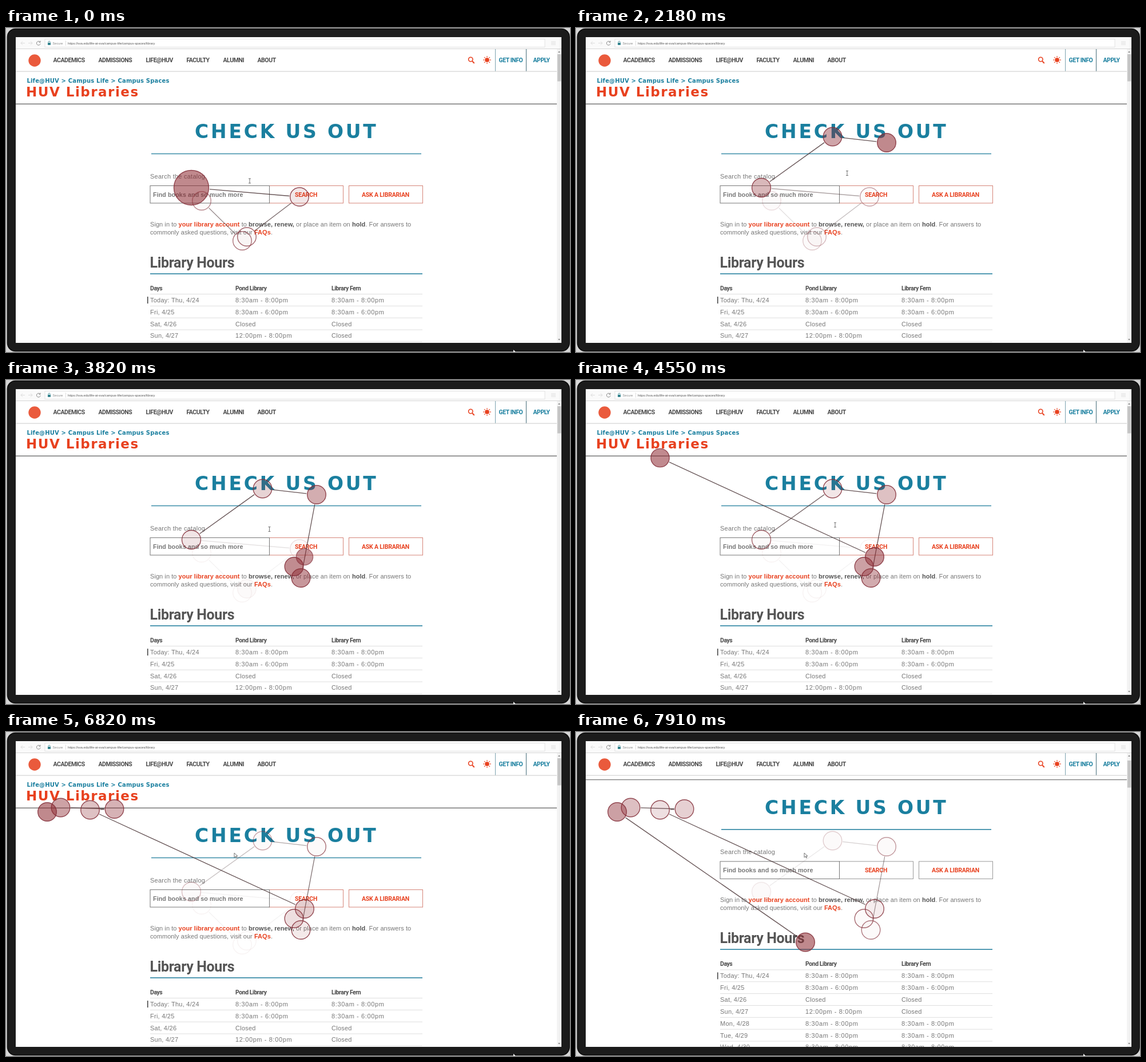
An HTML page that plays this animation: 986 px wide and 568 px high, repeating every 8000 ms.

```html
<!DOCTYPE html>
<html lang="en">
<head>
<meta charset="utf-8">
<title>Library page gaze plot</title>
<style>
  html, body { margin: 0; width: 100%; height: 100%; overflow: hidden; background: #d6d6d6; }
  svg { display: block; }
  text { font: 11px "Liberation Sans", Arial, sans-serif; fill: #777; letter-spacing: .06px; white-space: pre; }
  .bold { font-weight: 700; fill: #555; }
  .wide { font-family: "DejaVu Sans", sans-serif; font-weight: 700; }
  .narrow { font-family: Roboto, sans-serif; font-weight: 700; font-size: 10.5px; fill: #4a4a4a; letter-spacing: -.45px; }
  .button { letter-spacing: -.2px; }
  .tiny { font-size: 5.7px; fill: #555; letter-spacing: 0; }
  .time { letter-spacing: .62px; }
  .date { letter-spacing: .25px; }
  text.teal, .teal { fill: #1a7f9f; }
  text.red, .red { fill: #e8411f; }
</style>
</head>
<body>
<svg width="986" height="568" viewBox="0 0 986 568">
  <rect x="2.5" y="1.5" width="982.5" height="565" rx="14" fill="#1b1b1b" stroke="#0b0b0b" stroke-width="1.5"/>
  <path d="M887 564v5l4-1z" fill="#fff"/>
  <svg x="17" y="16" width="954" height="536" viewBox="17 16 954 536">
    <rect x="17" y="16" width="954" height="536" fill="#fff"/>
    <g id="page"></g>
    <g id="chrome"></g>
    <g id="gaze"></g>
    <g id="pointer" fill="none" stroke="#666" stroke-width=".9">
      <path id="beam" d="M-2-4h4M0-4v8M-2 4h4"/>
      <path id="arrow" d="M-1-4v8l2-2 1.5 3 1.2-.6-1.4-2.8h2.7z" fill="#fff"/>
    </g>
  </svg>
</svg>
<script>
const LOOP = 8000;
const el = id => document.getElementById(id);
const clamp = v => Math.max(0, Math.min(1, v));
const smooth = v => { v = clamp(v); return v * v * (3 - 2 * v); };

const text = (x, y, cls, content, style = '') =>
  `<text x="${x}" y="${y}" class="${cls}" style="${style}">${content}</text>`;
const line = (x1, y1, x2, y2, color, width = 1, opacity = 1) =>
  `<line x1="${x1}" y1="${y1}" x2="${x2}" y2="${y2}" stroke="${color}" stroke-width="${width}" opacity="${opacity}"/>`;
const box = (x, y, w, h, fill, stroke = 'none', cls = '') =>
  `<rect x="${x}" y="${y}" width="${w}" height="${h}" fill="${fill}" stroke="${stroke}" class="${cls}"/>`;

function pageMarkup() {
  const bold = s => `<tspan class="bold">${s}</tspan>`;
  const link = s => `<tspan class="bold red" style="fill:#e8411f">${s}</tspan>`;
  const open = '8:30am - 8:00pm', friday = '8:30am - 6:00pm', shut = 'Closed';
  const rows = [
    ['Today: Thu, 4/24', open, open], ['Fri, 4/25', friday, friday], ['Sat, 4/26', shut, shut],
    ['Sun, 4/27', '12:00pm - 8:00pm', shut], ['Mon, 4/28', open, open],
    ['Tue, 4/29', open, open], ['Wed, 4/30', open, open]
  ];
  const table = rows.map((row, i) => {
    const y = 480.9 + i * 20.85;
    return line(252, y - 14.4, 728, y - 14.4, '#dedede') + row.map((cell, c) =>
      text([252, 401, 569][c], y, c && cell !== shut ? 'time' : 'date', cell)).join('');
  }).join('');
  return text(36.5, 96.3, 'wide teal', 'Life@HUV &gt; Campus Life &gt; Campus Spaces', 'font-size:10px;letter-spacing:.16px')
    + text(35, 120.3, 'wide red', 'HUV Libraries', 'font-size:23px;letter-spacing:1.5px')
    + line(17, 133.2, 963, 133.2, '#777', 1.4)
    + text(330, 193.3, 'wide teal', 'CHECK US OUT', 'font-size:33px;letter-spacing:3.8px')
    + line(254, 220.5, 726, 220.5, '#3a8ca8', 1.7)
    + text(252, 263.6, 'date', 'Search the catalog')
    + box(460.5, 276.5, 129, 30.5, 'none', '#d58478', 'outline')
    + box(599.5, 276.5, 129, 30.5, 'none', '#d58478', 'outline')
    + box(252, 276.5, 208.5, 30.5, 'none', '#777')
    + text(257, 295.7, 'bold', 'Find books and so much more', 'font-size:10.75px;fill:#777')
    + text(505, 296, 'narrow button red', 'SEARCH')
    + text(622, 296, 'narrow button red', 'ASK A LIBRARIAN')
    + text(252, 347.6, '', `Sign in to ${link('your library account')} to ${bold('browse, renew,')} or place an item on ${bold('hold')}. For answers to`)
    + text(252, 362, '', `commonly asked questions, visit our ${link('FAQs')}.`)
    + text(251.5, 419.5, 'narrow', 'Library Hours', 'font-size:25px;letter-spacing:-.35px;fill:#555')
    + line(252, 430.8, 728, 430.8, '#3a8ca8', 1.7)
    + text(252, 459.8, 'narrow', 'Days') + text(401, 459.8, 'narrow', 'Pond Library') + text(569, 459.8, 'narrow', 'Library Fern')
    + table + line(247.7, 471, 247.7, 483, '#444', 1.6);
}

function chromeMarkup() {
  const nav = { ACADEMICS: 82.5, ADMISSIONS: 161.5, 'LIFE@HUV': 244.5, FACULTY: 315.5, ALUMNI: 379.5, ABOUT: 439.5 };
  const rays = Array.from({ length: 8 }, (_, i) =>
    `<path d="M841 51.2v-2" stroke="#e8411f" stroke-width="1.3" transform="rotate(${i * 45} 841 56)"/>`).join('');
  return box(17, 16, 954, 60, '#fff')
    + box(17, 16, 954, 20.5, '#fafafa') + box(68, 19.5, 874, 14, '#fff', '#e2e2e2')
    + line(17, 36.5, 971, 36.5, '#d5d5d5')
    + '<path d="M33 26.5h-7m3-3-3 3 3 3M39 26.5h7m-3-3 3 3-3 3" fill="none" stroke="#ddd"/>'
    + '<path d="M59.4 24.4a3.4 3.4 0 1 0 .8 3M60 22.5v2.6h-2.6" fill="none" stroke="#888"/>'
    + box(73, 26, 5, 3.8, '#2d7f8a') + '<path d="M74 26v-1.5a1.5 1.5 0 0 1 3 0V26" fill="none" stroke="#2d7f8a" stroke-width=".8"/>'
    + text(81.5, 29, 'tiny', 'Secure', 'fill:#888') + line(104.5, 22, 104.5, 31, '#ddd')
    + text(108, 29, 'tiny', 'https://sva.edu/life-at-sva/campus-life/campus-spaces/library')
    + [24, 26.5, 29].map(y => line(953, y, 961, y, '#ddd')).join('')
    + '<circle cx="50" cy="57" r="10.7" fill="#ea5a3c"/>'
    + Object.entries(nav).map(([label, x]) => text(x, 60.2, 'narrow', label)).join('')
    + '<path d="M815.3 58.3l3.4 3.6" stroke="#e8411f" stroke-width="2"/><circle cx="812.3" cy="55" r="3.7" fill="none" stroke="#e8411f" stroke-width="1.6"/>'
    + '<circle cx="841" cy="56" r="3.8" class="red"/>' + rays
    + line(855.5, 37, 855.5, 76, '#7ca3af') + line(909.5, 37, 909.5, 76, '#5d7f8a', 1.2)
    + text(861.5, 60.2, 'narrow teal', 'GET INFO') + text(921.5, 60.2, 'narrow teal', 'APPLY')
    + line(17, 76.2, 963, 76.2, '#d5d5d5', 1.2)
    + box(963, 37, 8, 515, '#f3f3f3')
    + '<path d="M965 43l2-2.5 2 2.5zM965 545l2 2.5 2-2.5z" fill="#888"/>'
    + '<rect id="thumb" x="964" y="46" width="6.5" height="47.5" fill="#c6c6c6"/>';
}

// Fixations in gaze order: x, y, start and end of dwell in ms.
const fixations = [
  [342, 303, -6000, -5000], [413, 373, -5000, -4500], [421, 366, -4500, -4100], [513, 296, -4100, -3450],
  [324, 280, -3450, 450], [448.5, 190.5, 540, 1130], [543, 201, 1130, 2500], [515.5, 347, 2500, 3300],
  [503.5, 327, 3300, 3700], [522, 310, 3700, 4270], [147, 136.5, 4270, 4750], [189.5, 135, 4750, 5300],
  [95.5, 132.5, 5300, 5900], [72, 140, 5900, 7050], [401, 368.5, 7050, 9000]
].map(([x, y, start, end], i) => ({ x, y, start, end, first: i === 4 }));

function gazeMarkup(t) {
  const residue = t < 7600 ? .06 : 0;
  const seen = fixations.filter(f => f.start <= t).map(f => {
    const age = Math.max(0, t - f.end), grown = clamp((t - f.start) / 300);
    return {
      ...f,
      r: f.first ? 30.5 - 14 * clamp((t - 400) / 240) : 13.5 + 2.8 * grown,
      fill: Math.max(.025, .55 * (1 - age / 4300)) * (.8 + .2 * grown) * (age < 8000),
      ink: Math.max(residue, .85 * clamp((8000 - age) / 4500)) * (.6 + .4 * grown)
    };
  });
  const links = seen.slice(1).map((b, i) => {
    const a = seen[i], dx = b.x - a.x, dy = b.y - a.y, d = Math.hypot(dx, dy);
    if (d < a.r + b.r) return '';
    const from = (a.r + 1.5) / d, to = 1 - (b.r + 1.5) / d;
    return line(a.x + dx * from, a.y + dy * from, a.x + dx * to, a.y + dy * to, '#4a3436', 1.3, Math.min(a.ink, b.ink));
  });
  const dots = seen.map(f => `<circle cx="${f.x}" cy="${f.y}" r="${f.r}" fill="#8c2830" fill-opacity="${f.fill}" stroke="#84303a" stroke-width="1.4" stroke-opacity="${f.ink}"/>`);
  return links.join('') + dots.join('');
}

const pointerPath = [
  [450, 426, 268], [1270, 480, 240], [3090, 468, 269], [4550, 453, 254], [5450, 299, 194], [6820, 400, 216]
];

function pointerAt(t) {
  const next = pointerPath.findIndex(p => p[0] > t);
  if (next === 0) return pointerPath[0].slice(1);
  if (next < 0) return pointerPath.at(-1).slice(1);
  const [t0, x0, y0] = pointerPath[next - 1], [t1, x1, y1] = pointerPath[next];
  const k = smooth((t - t0) / (t1 - t0));
  return [x0 + (x1 - x0) * k, y0 + (y1 - y0) * k];
}

el('page').innerHTML = pageMarkup();
el('chrome').innerHTML = chromeMarkup();
const outlines = document.querySelectorAll('.outline');

function draw(now) {
  const t = now % LOOP;
  const scroll = smooth((t - 7560) / 300);
  el('page').setAttribute('transform', `translate(0 ${-49.6 * scroll})`);
  el('thumb').setAttribute('y', 46 + 4 * scroll);
  outlines.forEach(o => o.setAttribute('stroke', scroll > 0 ? '#999' : '#d58478'));
  el('gaze').innerHTML = gazeMarkup(t);
  el('pointer').setAttribute('transform', `translate(${pointerAt(t)})`);
  const overText = t < 4900;
  el('beam').setAttribute('visibility', overText ? 'visible' : 'hidden');
  el('arrow').setAttribute('visibility', overText ? 'hidden' : 'visible');
  requestAnimationFrame(draw);
}
requestAnimationFrame(draw);
</script>
</body>
</html>
```
